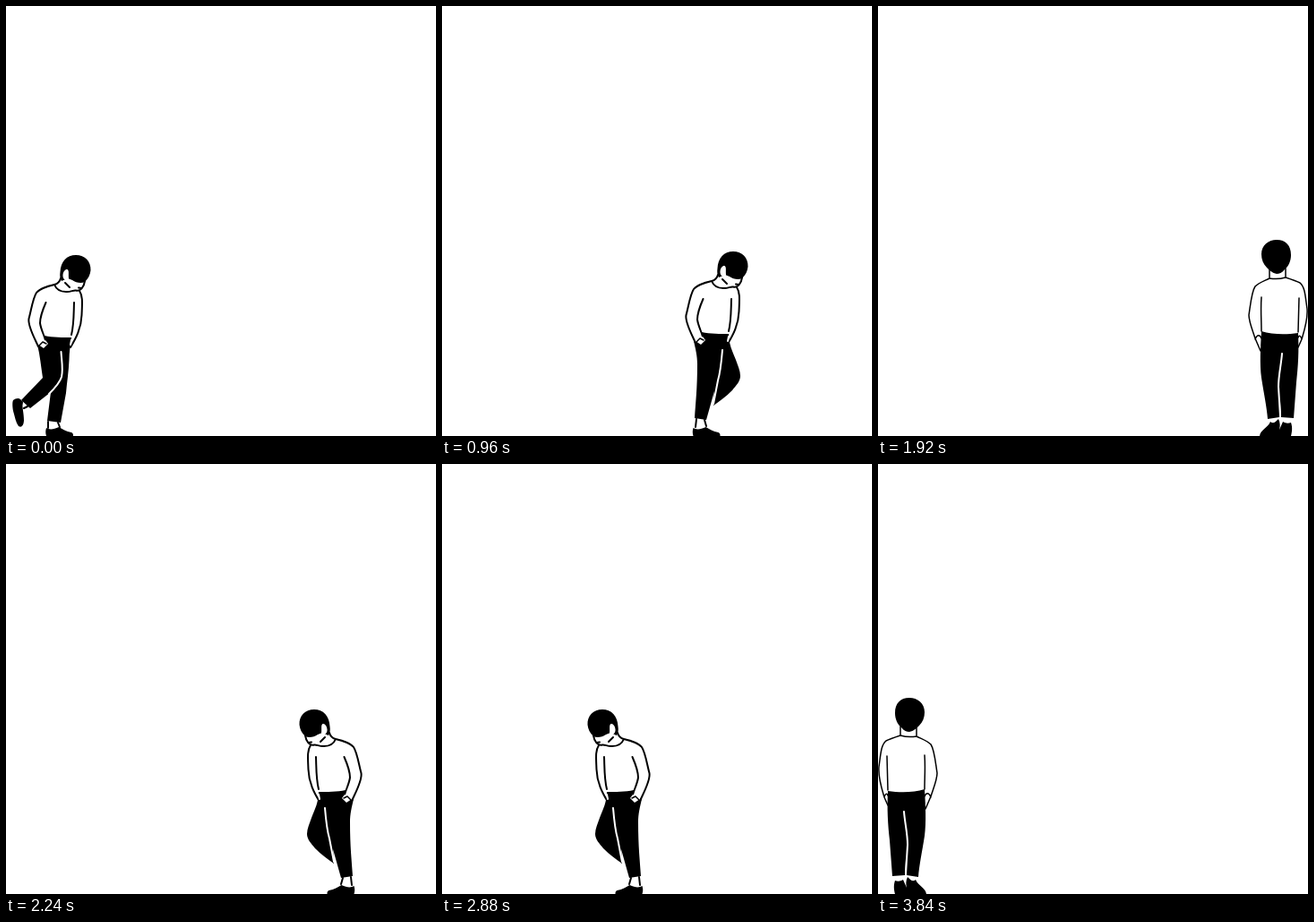
Write an HTML page that moves like this. It is 480 px wide and 480 px high and loops after 4 s.

```html
<!DOCTYPE html>
<html lang="en">
<head>
<meta charset="utf-8">
<title>Pacing</title>
<style>
  html, body { margin: 0; height: 100%; overflow: hidden; background: #fff; }
  svg { display: block; width: 100vw; height: 100vh; }
  .line { fill: none; stroke: #000; stroke-width: 2; stroke-linecap: round; stroke-linejoin: round; }
  .thin { stroke-width: 1.5; }
  .gap { fill: none; stroke: #fff; stroke-width: 2; stroke-linecap: round; }
  .skin { fill: #fff; }
</style>
</head>
<body>
<svg viewBox="0 0 480 480">
  <defs>
    <g id="torso">
      <path d="M60.500 297C61 285 68 278 78 278C88 278 95 285 94.500 295C94 300 92 304 88 308C84 310 78 309 74 306L69 304L62 307C60 304 60 300 60.500 297Z"/>
      <path class="skin" d="M69 306C66 307 63 304 63.500 300C64 296 67 293 69 294.500C70.500 296 69.500 300 70 304Z"/>
      <path class="line" d="M61 304C60 308 58 310 54 311C46 313 38 315 34 320C30 326 28 340 25.500 349C24 357 32 371 36 380M54 311C56 316 61 319 67 319C72 319.500 75 317 78 317.500C83 319 87 314 88 307M66 309L71 314M81 314.500L84 315M82 318C86 324 85 332 84.500 345C84 360 78 371 72 381M44.500 331C41 339 38 347 38 354C39 361 42 366 44 373M76 331C75.500 343 76 355 73 367"/>
    </g>
    <g id="hand">
      <path class="skin" d="M36 378L44 373L47 377L42 382Z"/>
      <path class="line thin" d="M37 379L41 375L45 377"/>
      <path class="gap" d="M72 378L73 373"/>
    </g>
    <path id="shoe" d="M0 0C3 2 8 2 14 -1C18 1 22 4 28 5C30 6 30 7 30 9H0C-1 6 -1 3 0 0Z"/>

    <g id="lifted">
      <path d="M43 368C52 370 64 370 73 370C72 378 70.500 386 70.500 395C70 408 68 420 67 432L61 465L46 463L50 431L27 449L17 440L41 415C39 402 38 390 35 378L44 380Z"/>
      <path class="gap" d="M61.500 386C62 395 64 405 62 414C60 421 54 427 48 433"/>
      <path class="line" d="M47 464V471M58 465L60 470M18 442L17 446M24 447L20 449"/>
      <path d="M8 440C12 437 17 437 18.500 443C18 449 20 454 20 463C19.500 469 17 471 14 469C11 465 10 459 8 452C7 447 7 442 8 440Z"/>
      <use href="#shoe" x="45" y="471"/>
      <use href="#torso"/><use href="#hand"/>
    </g>

    <g id="nearStep">
      <path d="M43 368C52 370 64 370 73 370C74 382 70 396 74 412L87 457L73 463L51 416L47 438L26 464L14 456L35 425C40 407 39 394 36 378Z"/>
      <path class="gap" d="M47 404L54 425"/>
      <path class="line" d="M17 459L15 464M24 464L23 470M76 464L77 472M86 460L87 469"/>
      <path d="M9 463C11 459 14 461 16 464C20 470 25 473 31 479C34 482 32 484 27 483C20 481 13 474 9 469Z"/>
      <use href="#shoe" x="76" y="472" transform="rotate(-6 76 482)"/>
      <use href="#torso"/><use href="#hand"/>
    </g>

    <g id="passing">
      <path d="M43 368C52 370 64 370 73 370C73 381 77 389 81 399C83 405 86 411 86 417C86 423 81 428 77 433C70 440 63 445 56 450L57 434L48 466L35 464C36 448 38 431 38 404C38 394 36 387 34 378L44 380Z"/>
      <path class="gap" d="M66 388C65 400 64 412 61 422L56 448"/>
      <path class="line" d="M37 465L36 474M46 466L48 473"/>
      <use href="#shoe" x="33.500" y="475"/>
      <use href="#torso"/><use href="#hand"/>
    </g>

    <g id="farStep">
      <path d="M43 368C52 370 64 370 73 370C75 383 80 397 84 411L101 457L86 463L62 417C59 426 51 433 43 439L17 462L5 453L32 419C38 407 39 392 36 378Z"/>
      <path class="gap" d="M66 388C66 400 65 409 61 418"/>
      <path class="line" d="M7 456L3 461M14 461L11 467M89 464L88 471M98 460L99 468"/>
      <path d="M-5 460C-3 456 1 458 4 463C9 468 16 472 22 477C26 480 24 482 19 481C10 479 2 474 -4 467Z"/>
      <use href="#shoe" x="82" y="471" transform="rotate(-6 82 480)"/>
      <use href="#torso"/><use href="#hand"/>
    </g>

    <g id="back">
      <path d="M428 277C428 267 436 261 445 261C455 261 461 267 461 278C461 285 458 291 454 294C451 298 448 299 445 299C440 298 437 295 434 292C430 288 428 283 428 277Z"/>
      <path class="line thin" d="M437 293V304C431 307 425 309 421 313C417 319 416 332 414 345C414 353 419 364 421 371L427 385M455 293V303C461 305 467 307 471 309C477 314 477 325 479 338C480 350 476 362 473 372L469 381M437 304C443 305 450 304.500 455 303M428 325C427 338 428 350 428 363M470 326L469 364M421 372C423 367 426 366 428 371M473 372C472 368 470 367 469 370"/>
      <path d="M428 363C440 367 456 367 469 365C470 385 469 402 467 420L464 460L450 459L449 440L448 459L435 461C434 448 431 434 428 415C426 400 427 380 428 363Z"/>
      <path class="gap" d="M451 388C450 401 447 412 447 425L449 458"/>
      <path d="M426 480C427 473 435 471 438 464C441 467 444 464 447 461C449 465 449 469 448 473L452 464C455 466 458 466 461 465C463 471 462 476 461 480Z"/>
    </g>
  </defs>
  <use id="walker"/>
</svg>
<script>
  const STEP = 160;
  const GAIT = [["lifted", 0], ["nearStep", -3], ["passing", -4], ["farStep", -1]];
  const RIGHTWARD = [0, 43, 86, 125, 164, 205, 247, 289, 326, 367];
  const LEFTWARD = [13, 58, 100, 137, 180, 223, 264, 304, 346];

  const walk = (positions, firstStep, flip) => positions.map((x, i) => {
    const [pose, y] = GAIT[(i + firstStep) % 4];
    return { pose, x, y, flip };
  });
  const turn = flip => [
    { pose: "passing", x: 381, y: -38, flip },
    { pose: "back", x: 0, y: -42, flip },
    { pose: "back", x: 0, y: 0, flip },
  ];
  const cycle = [
    ...walk(RIGHTWARD, 0, false), ...turn(false),
    ...walk(LEFTWARD, 1, true), ...turn(true),
  ];

  const walker = document.getElementById("walker");
  function draw(now) {
    const { pose, x, y, flip } = cycle[Math.floor(now / STEP) % cycle.length];
    walker.setAttribute("href", "#" + pose);
    walker.setAttribute("transform", `${flip ? "translate(480 0) scale(-1 1) " : ""}translate(${x} ${y})`);
  }

  const start = performance.now();
  function tick() {
    draw(performance.now() - start);
    requestAnimationFrame(tick);
  }
  tick();
</script>
</body>
</html>
```
